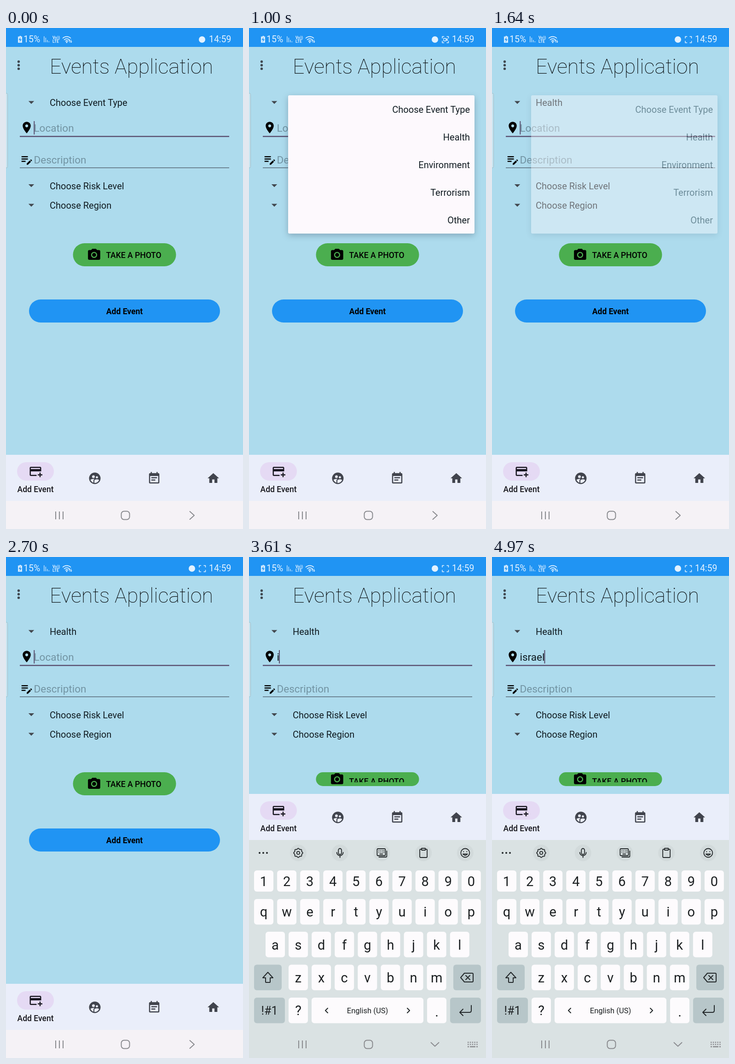
Write an HTML page that moves like this. It is 515 px wide and 1087 px high and loops after 5 s.

```html
<!DOCTYPE html>
<html lang="en">
<head>
<meta charset="utf-8">
<title>Events form</title>
<style>
  html, body { margin: 0; width: 100%; height: 100%; overflow: hidden; background: #addbed; }
  svg { display: block; }
  text { font-family: Roboto, "Noto Sans", "DejaVu Sans", sans-serif; white-space: pre; }
  .mid { text-anchor: middle; }
  .end { text-anchor: end; }
  .body { font-size: 20px; fill: #101b21; }
  .field { font-size: 22.5px; }
  .hint { fill: #7294a3; }
  .line { fill: none; stroke-linecap: round; stroke-linejoin: round; }
  #popup { filter: drop-shadow(0 4px 7px rgba(20, 40, 60, .28)); }
</style>
</head>
<body>
<svg id="stage" width="100%" height="100%" viewBox="0 0 515 1087">
  <defs>
    <path id="arrow" d="M7 10l5 5 5-5z" transform="scale(1.25)" fill="#42484f"/>
    <path id="pin" class="line" stroke="#252b2d" stroke-width="1.7" d="M0 10C-4 5-8.500 1-8.500-3a8.500 8 0 0 1 17 0C8.500 1 4 5 0 10zM-2.500-2.500a2.500 2.500 0 1 0 5 0a2.500 2.500 0 1 0-5 0"/>
  </defs>
  <rect width="515" height="1087" fill="#addbed"/>

  <!-- status bar -->
  <rect width="515" height="41" fill="#2094f3"/>
  <g fill="#e3f2ff">
    <path d="M28 18.500h1.500v-1.500h3v1.500H35V32H26V18.500z" opacity=".9"/>
    <path d="M31.500 20l-4 6h3l-1 4.500 4.500-6h-3z" fill="#2094f3"/>
    <text x="38" y="31" font-size="19.5">15%</text>
    <path d="M82 18h1.600v13H82zM85.500 21h1.600v10h-1.600zM89 26h1.600v5H89zM92.500 29h1.600v2h-1.600z" opacity=".75"/>
    <text x="101" y="23.500" font-size="8.500" font-weight="700">Vo))</text>
    <text x="101" y="32" font-size="8.500" font-weight="700">LTE</text>
    <g class="line" stroke="#e3f2ff" stroke-width="1.700">
      <path d="M123.500 22a12.500 12.500 0 0 1 17 0M126.500 25.500a8 8 0 0 1 11 0M129.500 28.500a4 4 0 0 1 5 0"/>
      <path d="M138 31v-5m-1.500 1.500l1.500-2 1.500 2M141.500 26v5m-1.500-1.500l1.500 2 1.500-2" stroke-width="1.100"/>
    </g>
    <circle cx="132" cy="31" r="1.600"/>
    <circle id="badge" cy="25" r="7"/>
    <g id="recorder">
      <path class="line" stroke="#e3f2ff" stroke-width="1.500" d="M420 22v-3.500h3.500M430 18.500h3.500V22M433.500 28.500V32H430M423.500 32H420v-3.500"/>
      <path id="camera" class="line" stroke="#e3f2ff" stroke-width="1.300" d="M423 22.500h5v5.500h-5zM428 25l3-2v4.500z"/>
    </g>
    <text x="489.500" y="31" font-size="19.5" class="end">14:59</text>
  </g>

  <!-- header -->
  <g fill="#3f4850"><circle cx="27.500" cy="73" r="2.700"/><circle cx="27.500" cy="80.700" r="2.700"/><circle cx="27.500" cy="88.400" r="2.700"/></g>
  <text x="272.500" y="98.500" font-size="45" font-weight="100" class="mid" fill="#05090b">Events Application</text>
  <rect x="-6" y="141.500" width="9.500" height="162" rx="3" fill="#c6e4ef" stroke="#9dbbc7"/>

  <!-- form -->
  <use href="#arrow" x="40" y="146"/><text id="kind" class="body" x="95" y="168.500"></text>
  <path transform="translate(30 201) scale(1.25)" d="M12 2C8.130 2 5 5.130 5 9c0 5.250 7 13 7 13s7-7.750 7-13c0-3.870-3.130-7-7-7zm0 9.500a2.500 2.500 0 0 1 0-5 2.500 2.500 0 0 1 0 5z"/>
  <text id="place" class="field" x="60.500" y="225"></text>
  <rect x="30" y="234" width="455" height="2.500" fill="#5c5273"/>
  <rect id="cursor" y="202" width="2" height="29" fill="#594f6e"/>
  <path transform="translate(30 270.500) scale(1.25)" d="M3 10h11v2H3v-2zm0-2h11V6H3v2zm0 8h7v-2H3v2zm15.010-3.130l.71-.71c.39-.39 1.020-.39 1.410 0l.71.71c.39.39.39 1.020 0 1.410l-.71.71-2.120-2.120zm-.71.71l-5.300 5.300V21h2.120l5.300-5.300-2.120-2.120z"/>
  <text class="field hint" x="60.500" y="294">Description</text>
  <rect x="30" y="302.700" width="455" height="1.300" fill="#4d5a66"/>
  <use href="#arrow" x="40" y="326.500"/><text class="body" x="95" y="349.500">Choose Risk Level</text>
  <use href="#arrow" x="40" y="369"/><text class="body" x="95" y="392">Choose Region</text>

  <rect id="photoPill" x="145.500" y="467" width="224" fill="#4bae4f"/>
  <path id="photoIcon" d="M9 2L7.170 4H4c-1.100 0-2 .9-2 2v12c0 1.100.9 2 2 2h16c1.100 0 2-.9 2-2V6c0-1.100-.9-2-2-2h-3.170L15 2H9zm3 15c-2.760 0-5-2.240-5-5s2.240-5 5-5 5 2.240 5 5-2.240 5-5 5zM12 8.800a3.200 3.200 0 1 0 0 6.400 3.200 3.200 0 0 0 0-6.400z"/>
  <svg id="photoClip" width="515" overflow="hidden"><text id="photoText" x="217.500" font-size="17.5" font-weight="500">TAKE A PHOTO</text></svg>
  <g id="submit">
    <rect x="50" y="589" width="415" height="50" rx="25" fill="#2094f3"/>
    <text x="257.500" y="621" font-size="17.5" font-weight="700" class="mid">Add Event</text>
  </g>

  <!-- tabs -->
  <rect id="footer" y="514" width="515" height="573"/>
  <g id="tabs" fill="#41444d">
    <rect y="926" width="515" height="100" fill="#eaeefa"/>
    <rect x="24" y="942" width="80" height="40" rx="20" fill="#e5daf4"/>
    <path transform="translate(49 947) scale(1.25)" fill="#1a1822" d="M20 4H4c-1.110 0-1.990.89-1.990 2L2 18c0 1.110.89 2 2 2h10v-2H4v-6h18V6c0-1.110-.89-2-2-2zm0 4H4V6h16v2zm4 9v2h-3v3h-2v-3h-3v-2h3v-3h2v3h3z"/>
    <text x="64" y="1007" font-size="17.5" font-weight="500" class="mid" fill="#17171d">Add Event</text>
    <path transform="translate(178 962) scale(1.25)" d="M12 2a10 10 0 1 0 0 20 10 10 0 0 0 0-20zm3.600 6.340a1.930 1.930 0 1 1 0 3.860 1.930 1.930 0 0 1 0-3.860zm-6-1.580a2.360 2.360 0 1 1 0 4.720 2.360 2.360 0 0 1 0-4.720zm0 9.130v3.750c-2.400-.75-4.300-2.600-5.140-4.960 1.050-1.120 3.670-1.690 5.140-1.690.53 0 1.200.08 1.900.22-1.640.87-1.900 2.020-1.900 2.680zM12 20l-.8-.04v-4.070c0-1.420 2.940-2.130 4.400-2.130 1.070 0 2.920.39 3.840 1.150C18.270 17.880 15.390 20 12 20z"/>
    <path transform="translate(307 962) scale(1.25)" d="M19 3h-1V1h-2v2H8V1H6v2H5a2 2 0 0 0-2 2v14a2 2 0 0 0 2 2h14a2 2 0 0 0 2-2V5a2 2 0 0 0-2-2zm0 16H5V8h14v11zM17 10H7v2h10v-2zm-3 4H7v2h7v-2z"/>
    <path transform="translate(435.500 962) scale(1.25)" d="M10 20v-6h4v6h5v-8h3L12 3 2 12h3v8z"/>
  </g>

  <g id="keyboard">
    <rect y="614" width="515" height="473" fill="#dae2e3"/>
    <g id="suggestions" fill="#d2dadb">
      <path class="line" stroke="#252b2d" stroke-width="1.800" d="M22 633l18 18m0-18l-18 18"/>
      <rect x="98" y="623" width="128" height="38" rx="19"/>
      <rect x="250" y="623" width="151" height="38" rx="19"/>
      <path d="M441 623v38h-3a13 19 0 0 1 0-38z"/>
      <use href="#pin" x="130.500" y="642"/><use href="#pin" x="282.500" y="642"/>
      <g fill="#252b2d" font-size="18.500"><text x="159" y="648">... ,60</text><text x="305" y="648">... ,קרנוש</text></g>
      <circle cx="483" cy="642" r="9.500" fill="#1f7ac9"/>
    </g>
    <g id="tools"></g>
    <g id="keys"></g>
    <g class="line" stroke="#23282a" stroke-width="2">
      <path d="M41 901l11 12h-6v9q0 1-1 1h-8q-1 0-1-1v-9h-6z"/>
      <path d="M468 903h17q2 0 2 2v15q0 2-2 2h-17l-8-9.500zM471 908l9 9m0-9l-9 9"/>
      <path d="M483 973v11q0 4-4 4h-21m7-7l-7 7 7 7"/>
      <path d="M171 979l-5 5 5 5M344 979l5 5-5 5"/>
    </g>
  </g>

  <!-- system navigation -->
  <g class="line" stroke="#8a8b8f" stroke-width="2">
    <path d="M108 1049v17m8-17v17m8-17v17" stroke-linecap="butt"/>
    <rect x="250.500" y="1048.500" width="18" height="18" rx="6"/>
    <path id="back" d="M399.500 1049l9.500 8.500-9.500 8.500"/>
    <g id="down">
      <path d="M395.500 1053.500l8.500 8 8.500-8"/>
      <path d="M475 1053h22M475 1057.500h22" stroke-width="2.500" stroke-dasharray="2.500 2.300" stroke-linecap="butt"/>
      <path d="M475 1062.500h3m2 0h12m2 0h3" stroke-width="2.500" stroke-linecap="butt"/>
    </g>
  </g>

  <g id="popup"><rect x="85" y="146" width="405" height="300" rx="3" fill="#fdf9fd"/></g>
</svg>
<script>
const LOOP = 5000;
const KEYBOARD_AT = 2730, SLIDE = 290, KEYBOARD_HEIGHT = 473;
const PICK_AT = 1510;
const TYPED = [[3450, 'i'], [3790, 's'], [4060, 'r'], [4330, 'a'], [4580, 'e'], [4800, 'l']];
const CURSOR_ON = [[0, 580], [PICK_AT, 2030], [2520, 3150], [3450, LOOP]];
const CHOICES = ['Choose Event Type', 'Health', 'Environment', 'Terrorism', 'Other'];

const $ = id => document.getElementById(id);
const add = (id, markup) => $(id).insertAdjacentHTML('beforeend', markup);
const set = (id, values) => {
  for (const name in values) $(id).setAttribute(name, values[name]);
};
const show = (id, on) => set(id, { visibility: on ? 'visible' : 'hidden' });
const ramp = (t, from, to) => Math.min(1, Math.max(0, (t - from) / (to - from)));
const smooth = p => p * p * (3 - 2 * p);

CHOICES.forEach((label, i) =>
  add('popup', `<text class="body end" x="480" y="${184 + i * 60}">${label}</text>`));

function key(x, y, width, height, label, baseline, size = 29, special = false) {
  add('keys', `<rect x="${x}" y="${y}" width="${width}" height="${height}" rx="6" fill="${special ? '#b7c6c9' : '#fdfbfd'}"/>
    <text class="mid" x="${x + width / 2}" y="${baseline}" font-size="${size}" fill="#1c2022">${label}</text>`);
}

function keyRow(letters, left, top, height, baseline) {
  [...letters].forEach((c, i) => key(left + i * 50.1, top, 42, height, c, baseline));
}

keyRow('1234567890', 11, 680, 46, 714);
keyRow('qwertyuiop', 11, 742, 55.5, 780);
keyRow('asdfghjkl', 36, 813, 55.5, 851.5);
keyRow('zxcvbnm', 86, 884.5, 55.5, 923);
key(11, 884.5, 60, 55.5, '', 0, 29, true);
key(444, 884.5, 60, 55.5, '', 0, 29, true);
key(11, 956, 67, 55.5, '!#1', 993, 25, true);
key(86, 956, 42, 55.5, '?', 994);
key(136, 956, 243, 55.5, 'English (US)', 990, 16.5);
key(387, 956, 42, 55.5, '.', 997);
key(437, 956, 67, 55.5, '', 0, 29, true);

const gear = Array.from({ length: 64 }, (_, i) => {
  const a = i * Math.PI / 32, r = 9 + Math.cos(8 * a) * 0.9;
  return (r * Math.cos(a)).toFixed(2) + ' ' + (r * Math.sin(a)).toFixed(2);
}).join('L');
const TOOL_ICONS = [
  `M${gear}zM-3.200 0a3.200 3.200 0 1 0 6.400 0a3.200 3.200 0 1 0-6.400 0`,
  'M-3.500-6a3.500 3.500 0 0 1 7 0v6a3.500 3.500 0 0 1-7 0zM-7-1a7 7 0 0 0 14 0M0 6v4',
  'M-9-9H6q2 0 2 2V4q0 2-2 2H-8q-2 0-2-2v-11q0-2 2-2M11-4V7q0 2-2 2H-6M-6-5h.1m3.900 0h.1m3.900 0h.1m2.900 0h.1M-6-1.500h.1m3.900 0h.1m3.900 0h.1m2.900 0h.1M-4 2.500h6',
  'M-4-8h-2q-2 0-2 2V8q0 2 2 2H6q2 0 2-2V-6q0-2-2-2H4M-4-10h8v4h-8z',
  'M-9.500 0a9.500 9.500 0 1 0 19 0a9.500 9.500 0 1 0-19 0M-3.500-3v.5M3.500-3v.5M-5 2.500q5 5.500 10 0z'
];
add('tools', [23, 31, 39].map(x => `<circle cx="${x}" cy="642" r="2" fill="#23282a"/>`).join(''));
TOOL_ICONS.forEach((d, i) => add('tools', `<g transform="translate(${107 + i * 90.700} 642)">
  <circle r="18" fill="#d2dadb"/><path class="line" stroke="#23282a" stroke-width="1.800" d="${d}"/></g>`));

function render(t) {
  const up = t >= KEYBOARD_AT;
  const word = TYPED.filter(([at]) => t >= at).map(([, c]) => c).join('');

  set('badge', { cx: 426 - 22 * smooth(ramp(t, 60, 450)) });
  set('recorder', { opacity: ramp(t, 250, 500) });
  show('camera', t < 1390);

  $('kind').textContent = t < PICK_AT ? CHOICES[0] : CHOICES[1];
  set('popup', { opacity: Math.min(ramp(t, 550, 760), 1 - ramp(t, PICK_AT, PICK_AT + 220)) });

  $('place').textContent = word || 'Location';
  set('place', { fill: word ? '#101b21' : '#7294a3' });
  set('cursor', { x: 60.3 + (word ? $('place').getComputedTextLength() - 0.8 : 0) });
  show('cursor', CURSOR_ON.some(([from, to]) => t >= from && t < to));

  // The shrunken window squeezes the photo button.
  set('photoPill', { height: up ? 30 : 50, rx: up ? 15 : 25 });
  set('photoIcon', { transform: `translate(175.500 ${up ? 466.4 : 476.4}) scale(1.33)` });
  set('photoText', { y: up ? 492.5 : 498.5 });
  set('photoClip', { height: up ? 488.5 : 1087 });
  show('submit', !up);

  set('footer', up ? { y: 514, height: 573, fill: '#fdf9fd' } : { y: 1026, height: 61, fill: '#f5f2f6' });
  set('tabs', { transform: `translate(0 ${up ? -412 : 0})` });
  const rest = (1 - ramp(t, KEYBOARD_AT, KEYBOARD_AT + SLIDE)) ** 5;
  set('keyboard', { transform: `translate(0 ${KEYBOARD_HEIGHT * rest})`, display: up ? 'inline' : 'none' });
  set('suggestions', { display: word ? 'none' : 'inline' });
  set('tools', { display: word ? 'inline' : 'none' });
  show('back', !up);
  show('down', up);
}

const start = performance.now();
function tick() {
  render((performance.now() - start) % LOOP);
  requestAnimationFrame(tick);
}
tick();
</script>
</body>
</html>
```
